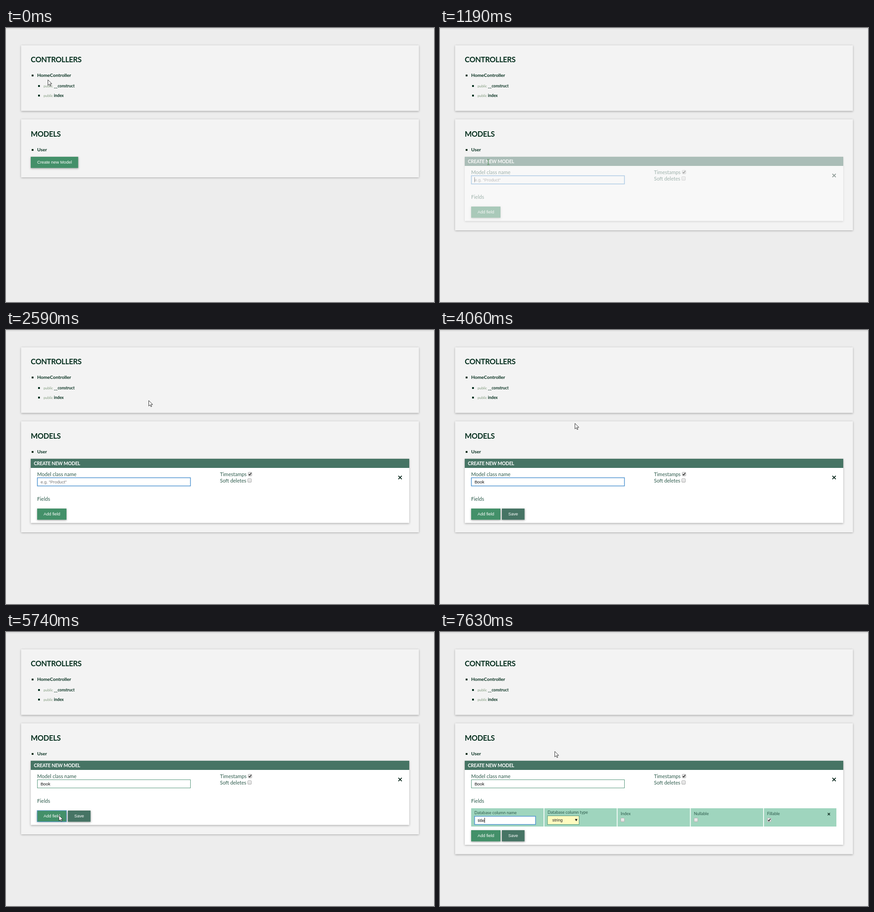
Recreate the animation shown at these times as an HTML page with a canvas. Size 934x600 px, loop 8 s.

```html
<!DOCTYPE html>
<html lang="en">
<head>
<meta charset="utf-8">
<title>Create new model</title>
<style>
html, body { margin: 0; width: 100%; height: 100%; overflow: hidden; background: #ededed; }
canvas { display: block; }
</style>
</head>
<body>
<canvas id="stage" width="934" height="600"></canvas>
<script>
const LOOP = 8000, STEP = 70;
const stage = document.getElementById('stage');
const layer = document.createElement('canvas');
layer.width = 934;
layer.height = 600;
const main = stage.getContext('2d'), form = layer.getContext('2d');
let g = main;

const SANS = 'Lato, "Open Sans", sans-serif';
const UI = '9.33px "Liberation Sans", Arial, sans-serif';
const DARK = '#06301f', LABEL = '#2c5a4b', GREEN = '#439069', DEEP = '#467464', BLUE = '#4f94d0';

// Times at which text grows and carets toggle
const nameKeys = [[2730, 'B'], [2940, 'Bo'], [3080, 'Boo'], [3150, 'Book']];
const fieldKeys = [[7210, 't'], [7350, 'ti'], [7420, 'tit'], [7560, 'titl'], [7630, 'title']];
const nameBlink = [840, 1610, 2100, 2590, 2730, 3640, 4130, 4550, 5040, 5530];
const fieldBlink = [5880, 6230, 6720];

// Pointer path: time, x, y
const path = [
  [0, 91, 113], [700, 105, 288], [840, 105, 293], [1190, 105, 293], [1610, 121, 360],
  [1960, 310, 154], [2240, 310, 154], [2310, 311, 154], [3990, 311, 154], [4060, 294, 204],
  [4550, 115, 401], [6160, 115, 401], [6720, 250, 261], [LOOP, 250, 261]
];

const arrow = new Path2D('M0 0V12L2.9 9.4L4.8 13.6L6.6 12.8L4.7 8.7H8.6Z');
const hand = new Path2D('M-1.3 1Q0 -.7 1.3 1V6L2.6 5.5L3.9 6.2L5.1 6L6.1 6.9L7.2 7.5V11.5L6 14.2V16.5H-1V14.6L-3.2 11.5L-4.8 9L-4 7.9L-2.8 8.6L-1.3 10.2Z');

const clamp = v => Math.max(0, Math.min(1, v));
const typed = (keys, t) => keys.reduce((s, k) => t >= k[0] ? k[1] : s, '');
const isOn = (times, t) => times.filter(v => t >= v).length % 2 === 1;

function pointerAt(t) {
  let i = 0;
  while (i < path.length - 2 && t >= path[i + 1][0]) i++;
  const [t0, x0, y0] = path[i], [t1, x1, y1] = path[i + 1];
  const p = clamp((t - t0) / (t1 - t0)), e = 1 - (1 - p) * (1 - p);
  return [x0 + (x1 - x0) * e, y0 + (y1 - y0) * e];
}

function text(s, x, y, font, color, spacing = 0) {
  g.font = font;
  g.letterSpacing = spacing + 'px';
  g.fillStyle = color;
  g.fillText(s, x, y);
}
const plain = (s, x, y, size = 11, color = LABEL) => text(s, x, y, `${size}px ${SANS}`, color);
const bold = (s, x, y, size, color = DARK, spacing = 0) => text(s, x, y, `bold ${size}px ${SANS}`, color, spacing);

function rect(x, y, w, h, color) {
  g.fillStyle = color;
  g.fillRect(x, y, w, h);
}

function raised(x, y, w, h, color, blur = 4, drop = 1, shade = 0.3) {
  g.save();
  g.shadowColor = `rgba(0,0,0,${shade})`;
  g.shadowBlur = blur;
  g.shadowOffsetY = drop;
  rect(x, y, w, h, color);
  g.restore();
}

function frame(x, y, w, h, color, width = 1) {
  g.strokeStyle = color;
  g.lineWidth = width;
  g.strokeRect(x + 0.5, y + 0.5, w - 1, h - 1);
}

function button(label, x, y, w, color, lift = 0) {
  raised(x, y, w, 24.5, color, 4 + lift * 3, 1 + lift, 0.32);
  text(label, x + 14, y + 15.4, UI, '#fff');
}

function input(x, y, w, h, value, hint, focus, caret) {
  rect(x, y, w, h, '#fff');
  frame(x, y, w, h, focus ? BLUE : '#56977c', focus ? 1.5 : 1);
  const tx = x + 7.4, ty = y + h / 2 + 3.3;
  text(value || hint, tx, ty, UI, value ? '#111' : '#777');
  if (caret) {
    const end = value ? g.measureText(value).width : 0;
    rect(Math.round(tx + end), ty - 9, 1, 11, '#111');
  }
}

function checkbox(x, y, checked) {
  const fill = g.createLinearGradient(0, y, 0, y + 9);
  fill.addColorStop(0, '#f0f0f0');
  fill.addColorStop(1, '#dcdcdc');
  g.beginPath();
  g.roundRect(x + 0.5, y + 0.5, 8, 8, 1.5);
  g.fillStyle = fill;
  g.fill();
  g.strokeStyle = '#b2b2b2';
  g.lineWidth = 1;
  g.stroke();
  if (!checked) return;
  g.beginPath();
  g.moveTo(x + 2, y + 4.6);
  g.lineTo(x + 3.8, y + 6.6);
  g.lineTo(x + 7.2, y + 2);
  g.strokeStyle = '#333';
  g.lineWidth = 1.7;
  g.stroke();
}

function cross(x, y, r, width) {
  g.beginPath();
  g.moveTo(x - r, y - r);
  g.lineTo(x + r, y + r);
  g.moveTo(x + r, y - r);
  g.lineTo(x - r, y + r);
  g.strokeStyle = '#0b281d';
  g.lineWidth = width;
  g.stroke();
}

function method(name, y) {
  rect(70, y - 5, 4, 4, DARK);
  plain('public', 82, y, 7.8, '#7f9a7c');
  bold(name, 104.5, y, 8.8);
}

function fieldRow(t) {
  for (let i = 0; i < 5; i++) rect(68 + i * 159.75, 386, 158, 40, '#9fd5be');
  plain('Database column name', 75, 398.6, 9);
  plain('Database column type', 234.7, 398, 9);
  input(75, 403, 134, 19, typed(fieldKeys, t), 'phone number', t >= 5880, isOn(fieldBlink, t));
  rect(234, 402, 70, 20, '#fffbc0');
  frame(234, 402, 70, 20, '#56977c');
  text('string', 245, 415.4, UI, '#222');
  g.beginPath();
  g.moveTo(294.5, 409.5);
  g.lineTo(300, 409.5);
  g.lineTo(297.25, 414.5);
  g.fillStyle = '#111';
  g.fill();
  ['Index', 'Nullable', 'Fillable'].forEach((s, i) => {
    const x = 394.2 + i * 159.75;
    plain(s, x, 401, 9);
    checkbox(Math.round(x), 407, i === 2);
  });
  cross(848.6, 398.7, 2.5, 1.3);
}

function drawForm(t) {
  const open = t >= 5810, by = open ? 434 : 391;
  raised(54, 282, 826, open ? 184 : 140.5, '#fff');
  rect(54, 282, 826, 20, DEEP);
  bold('CREATE NEW MODEL', 60.8, 296, 10.4, '#fff', -0.3);
  plain('Model class name', 68, 320.4);
  input(68, 323, 335, 19, typed(nameKeys, t), 'e.g. "Product"', t < 5670, isOn(nameBlink, t));
  plain('Timestamps', 467, 320.4);
  checkbox(528, 311, true);
  plain('Soft deletes', 467, 334.4);
  checkbox(527, 325, false);
  cross(860, 323, 3.7, 1.9);
  plain('Fields', 68, 374.2);
  if (open) fieldRow(t);

  const hover = open ? 0 : clamp((t - 4690) / 140);
  button('Add field', 68, by, 64, GREEN, hover * 0.5);
  if (t >= 5670 && !open) frame(67.5, by - 0.5, 65, 25.5, BLUE);
  g.globalAlpha = clamp((t - 2730) / 210);
  if (g.globalAlpha > 0) button('Save', 135, by, 49.5, DEEP);
  g.globalAlpha = 1;
}

function drawPointer(t) {
  const [x, y] = pointerAt(t);
  const onInput = t >= 840 && x > 68 && x < 403 && y > 322 && y < 343;
  const onTitle = t >= 840 && t < 1680 && y < 323;
  const onButton = t < 840 && y > 282;
  g.save();
  g.translate(Math.round(x), Math.round(y));
  if (onInput || onTitle) {
    g.fillStyle = onTitle ? '#4b8a4e' : '#222';
    g.fillRect(0, -5, 1, 11);
    g.fillRect(-2, -6, 2, 1);
    g.fillRect(1, -6, 2, 1);
    g.fillRect(-2, 6, 2, 1);
    g.fillRect(1, 6, 2, 1);
  } else {
    const shape = onButton || (t >= 5880 && t < 6230) ? hand : arrow;
    g.translate(0.5, 0.5);
    g.fillStyle = '#fff';
    g.fill(shape);
    g.strokeStyle = '#222';
    g.lineWidth = 0.9;
    g.lineJoin = 'round';
    g.stroke(shape);
  }
  g.restore();
}

function draw(t) {
  const hasForm = t >= 840;
  g = main;
  rect(0, 0, 934, 600, '#ededed');
  rect(0, 0, 934, 1, '#f4f4f4');
  rect(0, 1, 934, 1, '#c6c6c6');

  raised(33, 38, 868, 143.5, '#f3f3f3');
  bold('CONTROLLERS', 54, 75, 16.2, DARK, -0.33);
  rect(56, 102, 4, 4, DARK);
  bold('HomeController', 68, 107, 10.3);
  method('__construct', 130);
  method('index', 151);

  raised(33, 200, 868, !hasForm ? 127 : t < 5810 ? 243 : 286.5, '#f3f3f3');
  bold('MODELS', 54, 238, 16.2, DARK, -0.33);
  rect(56, 265, 4, 4, DARK);
  bold('User', 68, 270, 10.3);

  if (hasForm) {
    g = form;
    g.clearRect(0, 0, 934, 600);
    drawForm(t);
    g = main;
    g.globalAlpha = clamp((t - 890) / 720);
    g.drawImage(layer, 0, 0);
    g.globalAlpha = 1;
  } else {
    button('Create new Model', 54, 282, 103.5, GREEN, pointerAt(t)[1] > 282 ? 1 : 0);
  }
  drawPointer(t);
}

const start = performance.now();
function tick() {
  const t = (performance.now() - start) % LOOP;
  draw(Math.floor(t / STEP) * STEP);
  requestAnimationFrame(tick);
}
tick();
</script>
</body>
</html>
```
